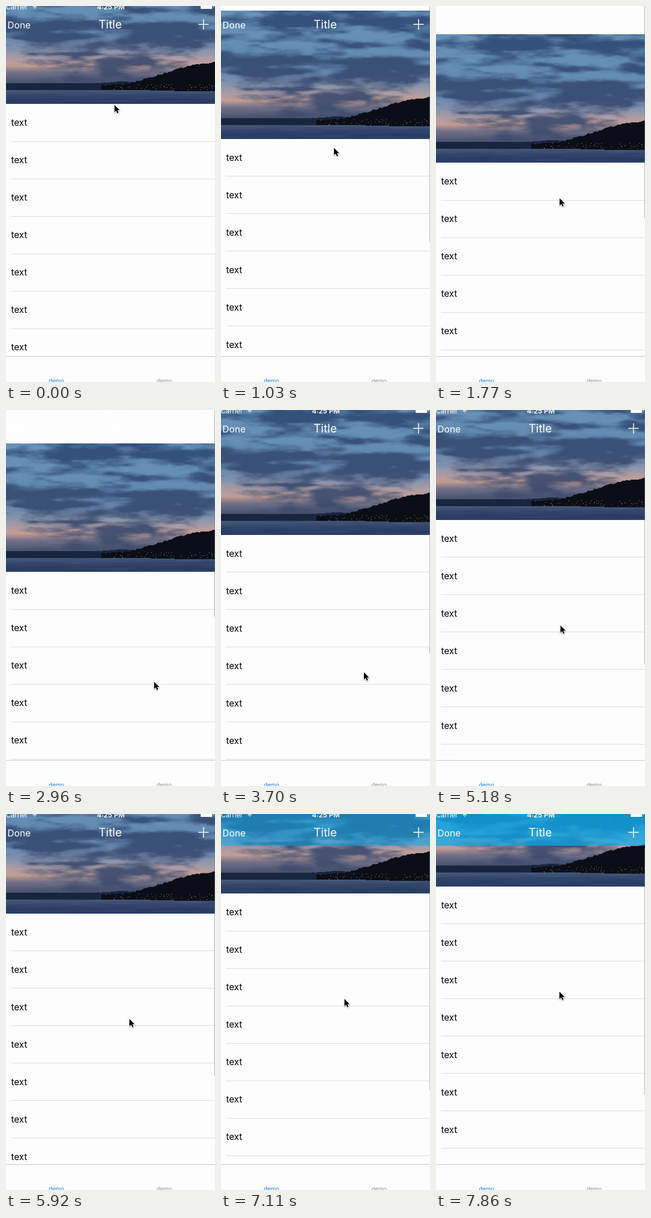
An HTML page with a canvas that plays this animation: 364 by 653 pixels, repeating every 8 s.

```html
<!DOCTYPE html>
<html lang="en">
<head>
<meta charset="utf-8">
<title>Scrolling list</title>
<style>
  html, body { margin: 0; width: 100%; height: 100%; overflow: hidden; background: #fdfdfd; }
  canvas { display: block; }
</style>
</head>
<body>
<canvas id="stage" width="364" height="653"></canvas>
<script>
const W = 364, H = 653, PHOTO_H = 223, ROW = 65, TAB_Y = 608;
const LOOP = 8000, HOLD = 290, STEP = 148.05;
const REST = 216, RELEASE = 17.8, REGRAB = 28.5, GRIP = 182.3;
const ctx = document.getElementById('stage').getContext('2d');

const clamp = v => Math.min(1, Math.max(0, v));
const mix = (a, b, p) => a + (b - a) * p;
const blend = (a, b, p) => a.map((v, i) => mix(v, b[i], p));
const smooth = (a, b, v) => {
  const p = clamp((v - a) / (b - a));
  return p * p * (3 - 2 * p);
};

// Interpolates keys of the form [position, value].
function sample(keys, at, join) {
  const i = Math.max(1, keys.findIndex(k => k[0] >= at));
  const [a, b] = [keys[i - 1], keys[i]];
  return join(a[1], b[1], clamp((at - a[0]) / (b[0] - a[0])));
}

// --- Motion, measured in display steps ---

const scrollKeys = [[REGRAB, REST], [30, 205.5], [39, 172.7], [47, 138], [52, 125.5]];

function cursorAt(n) {
  if (n >= REGRAB) return [mix(218, 215, smooth(30, 39, n)), listTop(n) + GRIP];
  const pull = Math.min(1, n / RELEASE);
  const back = smooth(22, REGRAB, n);
  return [
    mix(189 + 69 * pull ** 2, 218, back),
    mix(171 + 300 * pull ** 1.28, REST + GRIP, back)
  ];
}

// Pulling past the rest position meets rubber-band resistance.
function pulled(cursorY) {
  const y = cursorY - 1, over = y - REST;
  return over <= 0 ? y : REST + 630 * (1 - 1 / (1 + over * 0.53 / 630));
}

function listTop(n) {
  if (n >= REGRAB) return sample(scrollKeys, n, mix);
  if (n <= RELEASE) return pulled(cursorAt(n)[1]);
  const s = (n - RELEASE) * 1.18;
  return REST + (pulled(471) - REST) * (1 + s) * Math.exp(-s);
}

// --- Evening landscape ---

const skyKeys = [
  [0, [104, 146, 182]], [60, [101, 143, 182]], [105, [98, 133, 173]], [128, [132, 147, 174]],
  [145, [176, 157, 163]], [156, [196, 158, 149]], [168, [115, 113, 136]], [190, [62, 77, 106]]
];
// Large cloud banks: centre, half width, half height
const banks = [
  [100, 17, 75, 9], [290, 18, 45, 6], [224, 59, 32, 9],
  [75, 85, 120, 8], [265, 89, 120, 10], [60, 108, 75, 6], [150, 136, 95, 3]
];

function hash(x, y) {
  const v = Math.sin(x * 127.1 + y * 311.7) * 43758.5453;
  return v - Math.floor(v);
}

function noise(x, y) {
  const i = Math.floor(x), j = Math.floor(y);
  const u = smooth(0, 1, x - i), v = smooth(0, 1, y - j);
  return mix(mix(hash(i, j), hash(i + 1, j), u), mix(hash(i, j + 1), hash(i + 1, j + 1), u), v);
}

function fractal(x, y) {
  let sum = 0;
  for (let o = 0, size = 0.5; o < 5; o++, size /= 2) sum += size * noise(x * 2 ** o + o * 17, y * 2 ** o);
  return sum;
}

function skyColor(x, y) {
  const grain = fractal(x / 60, y / 15);
  const bank = banks.reduce((sum, [cx, cy, rx, ry]) =>
    sum + Math.exp(-(((x - cx) / rx) ** 2 + ((y - cy) / ry) ** 2)), 0);
  const cover = smooth(0.34, 0.72, grain + 0.28 * bank);
  const cloud = blend([46, 75, 120], [64, 76, 108], y / 190);
  return blend(sample(skyKeys, y, blend), cloud, cover * 0.92);
}

function photoColor(x, y) {
  const rough = 3 * noise(x / 4, 5);
  const hill = 190 - 39 * smooth(180, W, x) - rough + 1.5;
  const shore = 198 + 3 * smooth(180, W, x);
  const farLand = 187 - 3 * Math.exp(-(((x - 205) / 25) ** 2)) - rough / 3;
  if (y > shore) {
    const ripple = 12 * (noise(x / 40, y / 1.5) - 0.5);
    return blend([68, 87, 120], [44, 64, 102], smooth(197, 215, y)).map(v => v + ripple);
  }
  if (x > 170 && y > 188 && hash(x, y) > 0.975) return [165, 140, 115];
  if (x > 165 && y > hill) return [11, 14, 23];
  if (y > farLand) return [25, 37, 62];
  return skyColor(x, y);
}

function makePhoto() {
  const canvas = document.createElement('canvas');
  canvas.width = W;
  canvas.height = PHOTO_H;
  const g = canvas.getContext('2d');
  const image = g.createImageData(W, PHOTO_H);
  for (let y = 0; y < PHOTO_H; y++) {
    for (let x = 0; x < W; x++) image.data.set([...photoColor(x, y), 255], (y * W + x) * 4);
  }
  g.putImageData(image, 0, 0);
  return canvas;
}
const photo = makePhoto();

// --- Interface ---

function rect(color, x, y, w, h) {
  ctx.fillStyle = color;
  ctx.fillRect(x, y, w, h);
}

function label(text, x, y, size, color, align = 'left', weight = 400) {
  ctx.font = `${weight} ${size}px Inter, sans-serif`;
  ctx.textAlign = align;
  ctx.fillStyle = color;
  ctx.fillText(text, x, y);
}

function drawList(top) {
  for (let y = top; y < TAB_Y; y += ROW) {
    label('text', 9, y + 38.3, 15.8, '#000');
    rect('#dededf', 9, Math.floor(y + ROW), W, 1);
  }
}

function drawScrollbar(top) {
  const offset = REST - top;
  const start = -4 + Math.max(0, offset * 0.7);
  const end = 424 + offset * (offset > 0 ? 0.7 : 1);
  rect('rgba(130,130,130,.6)', 363, start, 1, end - start);
}

function drawNavigation(top) {
  rect(`rgba(0,175,240,${clamp((167.5 - top) / 62)})`, 0, 0, W, 55);
  label('Carrier', 0, 5.6, 11.6, '#fff');
  label('4:25 PM', 182.5, 5.6, 12, '#fff', 'center', 600);
  label('Done', 2.5, 39, 16.2, '#fff');
  label('Title', 181.5, 39, 19.8, '#fff', 'center');
  rect('#fff', 339, 0, 20, 5);
  rect('#fff', 361, 0, 1, 2);
  rect('#fff', 335, 31, 18, 1.5);
  rect('#fff', 343.3, 23, 1.5, 18);
  ctx.strokeStyle = '#fff';
  ctx.lineWidth = 1.5;
  for (const r of [1, 4, 7]) {
    ctx.beginPath();
    ctx.arc(50, 5, r, -Math.PI * 0.75, -Math.PI * 0.25);
    ctx.stroke();
  }
}

function drawTabs() {
  rect('#fdfdfd', 0, TAB_Y, W, H - TAB_Y);
  rect('#cbcbcc', 0, TAB_Y, W, 1);
  label('demo', 88, 655, 10, '#1b7fe8', 'center');
  label('demo', 275.5, 655, 10, '#929292', 'center');
}

const arrow = new Path2D('M0 0V14.6L3.4 11.5L5.7 16.8L8.2 15.7L5.9 10.6H10.5Z');
function drawCursor(x, y) {
  ctx.save();
  ctx.translate(x, y + 1);
  ctx.scale(0.85, 0.85);
  ctx.shadowColor = 'rgba(0,0,0,.4)';
  ctx.shadowBlur = 2;
  ctx.shadowOffsetY = 1;
  ctx.strokeStyle = '#fff';
  ctx.lineWidth = 1.6;
  ctx.stroke(arrow);
  ctx.shadowColor = 'transparent';
  ctx.fillStyle = '#000';
  ctx.fill(arrow);
  ctx.restore();
}

function draw(time) {
  const t = time % LOOP;
  const n = t < HOLD ? 0 : Math.min(52, Math.floor((t - HOLD) / STEP) + 1);
  const top = listTop(n);
  rect('#fdfdfd', 0, 0, W, H);
  ctx.drawImage(photo, 0, top - PHOTO_H);
  drawList(top);
  if (n > 0 && (n < 25 || n >= REGRAB)) drawScrollbar(top);
  drawNavigation(top);
  drawTabs();
  drawCursor(...cursorAt(n));
}

const began = performance.now();
function tick() {
  draw(performance.now() - began);
  requestAnimationFrame(tick);
}
tick();
</script>
</body>
</html>
```
